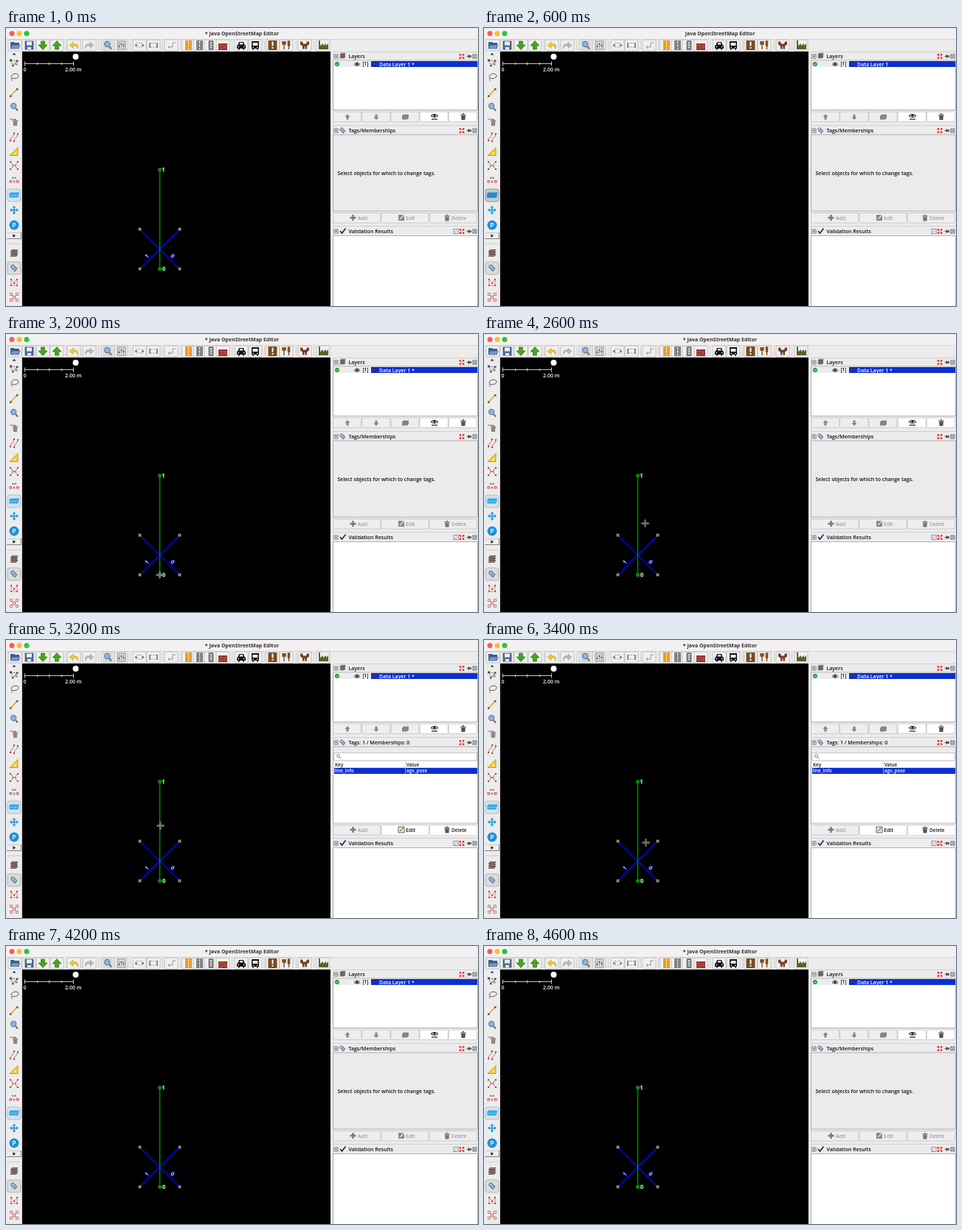
Animation, 640 px wide and 378 px high, one loop 4.8 s. Source, as an HTML page:

```html
<!DOCTYPE html>
<html lang="en">
<head>
<meta charset="utf-8">
<title>Map editor demo</title>
<style>
html, body { margin: 0; width: 100%; height: 100%; overflow: hidden; background: #ececec; }
svg { display: block; width: 640px; height: 378px; }
text { font: 600 7px "Open Sans", "Noto Sans", sans-serif; fill: #111; white-space: pre; }
.title { font-weight: 700; font-size: 7px; fill: #333; text-anchor: middle; }
.white { fill: #fff; }
.off { fill: #858585; font-weight: 500; }
.small { font-size: 6.4px; }
.line { fill: none; stroke: #555; stroke-width: .9; }
.red { stroke: #c4473f; }
.halo { paint-order: stroke; stroke-width: 2px; stroke-linejoin: round; fill: #fff; }

/* All states switch hard on a 200 ms grid. */
.drawn, .blank, .agv, .goal, .tagged, .idle, .arrow, .cross {
  animation: 4.8s step-end infinite;
}
.drawn { animation-name: drawn; }
.blank { animation-name: blank; }
.agv { animation-name: agv; }
.goal { animation-name: goal; }
.tagged { animation-name: tagged; }
.idle { animation-name: idle; }
.arrow { animation-name: arrow; }
.cross { animation-name: cross; }
@keyframes drawn { 0%, 37.5% { visibility: visible } 8.333% { visibility: hidden } }
@keyframes blank { 0%, 37.5% { visibility: hidden } 8.333% { visibility: visible } }
@keyframes agv { 0%, 75% { visibility: hidden } 62.5% { visibility: visible } }
@keyframes goal { 0%, 87.5% { visibility: hidden } 75% { visibility: visible } }
@keyframes tagged { 0%, 87.5% { visibility: hidden } 62.5% { visibility: visible } }
@keyframes idle { 0%, 87.5% { visibility: visible } 62.5% { visibility: hidden } }
@keyframes arrow {
  0%, 29.167% { visibility: hidden }
  16.667% { visibility: visible; transform: translate(17px, 222px) }
  20.833% { visibility: visible; transform: translate(13px, 228px) }
}
@keyframes cross {
  0% { visibility: hidden }
  29.167% { visibility: visible; transform: translate(130px, 290px) }
  33.333% { visibility: visible; transform: translate(208px, 327px) }
  45.833% { visibility: visible; transform: translate(212px, 300px) }
  50% { visibility: visible; transform: translate(217px, 266px) }
  54.167% { visibility: visible; transform: translate(218px, 257px) }
  58.333% { visibility: visible; transform: translate(212px, 253px) }
  62.5% { visibility: visible; transform: translate(209px, 252px) }
  70.833% { visibility: visible; transform: translate(219px, 275px) }
  75% { visibility: visible; transform: translate(223px, 284px) }
  87.5%, 100% { visibility: hidden }
}
</style>
</head>
<body>
<svg viewBox="0 0 640 378">
  <defs>
    <g id="well"><rect x="-9" y="-7.5" width="18" height="15" rx="1" fill="#f0f0f0" stroke="#b6b6b6" stroke-width=".8"/></g>
    <g id="glass">
      <path d="M2 2L5 5.5" stroke="#866a50" stroke-width="2"/>
      <circle cx="-.8" cy="-1" r="3.6" fill="#8fb6e4" stroke="#5c7ca6" stroke-width="1.2"/>
    </g>
    <g id="stack">
      <path d="M-5 4l2-3h8l-2 3zM-5 1l2-3h8l-2 3zM-5-2l2-3h8l-2 3z" fill="#8b6f68" stroke="#4d4140" stroke-width=".6"/>
    </g>
    <g id="tag">
      <path d="M-4-3l3-1 5 5-3 4-5-5z" fill="#8fabc8" stroke="#4f637b" stroke-width=".9"/>
      <circle cx="-2.2" cy="-2" r=".8" fill="#fff"/>
    </g>
    <g id="trash">
      <path d="M-3-2h6l-.6 6h-4.8z"/>
      <path d="M-3.8-3h7.6M-1-4.3h2" stroke="currentColor" stroke-width="1.2"/>
    </g>
    <g id="edit">
      <rect x="-4" y="-4" width="8" height="8" fill="#888"/>
      <path d="M-2 2L4-4" stroke="#ddd" stroke-width="1.5"/>
    </g>
    <g id="corner">
      <path d="M-3-3l2 2M3-3l-2 2M-3 3l2-2M3 3l-2-2" stroke="#d11" stroke-width="1.3"/>
      <path d="M-3-1v-2h2M3-1v-2h-2M-3 1v2h2M3 1v2h-2" fill="none" stroke="#d33" stroke-width=".8"/>
      <path d="M6.500 0h2.500M9-2.500v5M9-1h3.500v2H9" fill="#777" stroke="#444" stroke-width=".9"/>
      <rect x="15" y="-2.500" width="5" height="5" fill="#fff" stroke="#444" stroke-width=".8"/>
      <path d="M16-1.500l3 3m0-3l-3 3" stroke="#333" stroke-width=".8"/>
    </g>
    <g id="fold">
      <rect x="-2.500" y="-2.500" width="5" height="5" fill="#fff" stroke="#555" stroke-width=".8"/>
      <path d="M-1.500-.8h3L0 1.300z" fill="#222"/>
    </g>
    <g id="nodes">
      <path class="line red" d="M-4-4V4H4V-4L0 1z" stroke-dasharray="1.5 1"/>
      <path d="M-5 3h2v2h-2zM-5-5h2v2h-2zM3-5h2v2H3zM3 3h2v2H3zM-1 0h2v2h-2z" fill="#d33"/>
    </g>
    <rect id="end" x="-1.300" y="-1.300" width="2.600" height="2.600" fill="#111" stroke="#e8dc80" stroke-width=".9"/>
  </defs>

  <rect width="640" height="378" fill="#ececec"/>

  <!-- title bar -->
  <rect width="640" height="15" fill="#f2f0f1"/>
  <circle cx="8" cy="7.500" r="3.500" fill="#fc5b57"/>
  <circle cx="18" cy="7.500" r="3.500" fill="#fdbc2e"/>
  <circle cx="28" cy="7.500" r="3.500" fill="#29c440"/>
  <text class="title drawn" x="320" y="10">* Java OpenStreetMap Editor</text>
  <text class="title blank" x="320" y="10">Java OpenStreetMap Editor</text>

  <!-- toolbar -->
  <path d="M0 15.500H640" stroke="#d6d6d6"/>
  <g id="wells"></g>
  <path d="M81.500 17v13M125.500 17v13M168.500 17v13M212.500 17v13M236.500 17v13M306.500 17v13M350.500 17v13M393.500 17v13M417.500 17v13" stroke="#d2d2d2"/>
  <path d="M6 19h5l1 1h6v8H6z" fill="#3b5f8e"/>
  <path d="M6 28l2-5h11l-2 5z" fill="#6f9aca" stroke="#31527e" stroke-width=".6"/>
  <rect x="26" y="18" width="11" height="11" fill="#4a6f9e" stroke="#345" stroke-width=".7"/>
  <path d="M28 18.500h7v5h-7zM29 26h5v3h-5z" fill="#eee"/>
  <path d="M47.500 18h5v5h3.500L50 29.500 44 23h3.500z" fill="#49a416" stroke="#27750b" stroke-width=".7"/>
  <path d="M66.500 29h5v-5H75L69 17.500 63 24h3.500z" fill="#49a416" stroke="#27750b" stroke-width=".7"/>
  <path d="M97 28c2-6-2-7-6-6v-3l-5 4.500 5 4v-3c4-1 5 0 6 3.500z" fill="#f0cb32" stroke="#b8962c" stroke-width=".6"/>
  <path d="M108 28c-2-6 2-7 6-6v-3l5 4.500-5 4v-3c-4-1-5 0-6 3.500z" fill="#bcbcbc" stroke="#999" stroke-width=".6"/>
  <rect x="131" y="16.500" width="14" height="14" fill="#d9d9d9"/>
  <use href="#glass" x="138" y="23"/>
  <rect x="151" y="18" width="11" height="11" fill="#ddd" stroke="#777" stroke-width=".8"/>
  <path d="M153.500 20v7M156.500 20v7M159.500 20v7" stroke="#888" stroke-width=".8"/>
  <path d="M152.500 25h2M155.500 22h2M158.500 24h2" stroke="#444" stroke-width="1.500"/>
  <path class="line" d="M177 20.500h9M177 26h9M196 20.500h9M196 26h9" stroke-dasharray="2 1" style="stroke:#999"/>
  <path d="M175 22h3v3h-3zM184 22h3v3h-3zM194 20h2v7h-2zM204 20h2v7h-2z" fill="#888"/>
  <path class="line" d="M220 26h6V20M220 26l2-2m-2 2l2 2M226 20h4" style="stroke:#888"/>
  <rect x="243" y="17" width="9" height="13" fill="#f29a1c"/>
  <path d="M247.500 18v11" stroke="#fff" stroke-dasharray="3 1.500"/>
  <rect x="258" y="17" width="9" height="13" fill="#828282"/>
  <path d="M262.500 18v11" stroke="#fff" stroke-dasharray="3 1.500"/>
  <rect x="274.500" y="17" width="7" height="13" rx="1.500" fill="#777"/>
  <path d="M278 19v9" stroke="#ddd" stroke-width="2.500" stroke-dasharray="2.200 1"/>
  <path d="M288 21h12v9h-12z" fill="#9b3028"/>
  <path d="M288 24h12M288 27h12M292 21v3M297 24v3M292 27v3" stroke="#c07a70" stroke-width=".6"/>
  <path d="M313 28v-4l1.500-1 1.500-4h6l1.500 4 1.500 1v4h-2v1.500h-2V28h-4v1.500h-2V28z" fill="#111"/>
  <path d="M316.500 22.500l.8-2.500h3.500l.8 2.500z" fill="#eee"/>
  <path d="M333 18h10v10h-1v1.500h-2V28h-4v1.500h-2V28h-1z" fill="#111"/>
  <path d="M334.500 20h7v4h-7z" fill="#eee"/>
  <path d="M314.500 25.500h1.500M322 25.500h1.500M334.500 26.500h1.500M340 26.500h1.500" stroke="#eee" stroke-width="1.300"/>
  <rect x="355.500" y="17" width="12" height="13" rx="1" fill="#7a4a1c"/>
  <path d="M361.500 18.500v6M361.500 26v2" stroke="#fff" stroke-width="2"/>
  <path d="M377 18v11M375 18v4h4v-4M383.500 18v11M382.500 18h2v6h-2z" fill="#80501f" stroke="#80501f" stroke-width="1.500"/>
  <path d="M399 18.500h3l1 3h4l1-3h3v4l-3 2v4h-2.500V25h-1V28.500H402v-4l-3-2z" fill="#754027"/>
  <path d="M424 29V17h2v7l4-3v3l4-3v3l3-3v8z" fill="#5f5f2c"/>

  <!-- map -->
  <rect x="22" y="32" width="418" height="346"/>
  <circle cx="94.500" cy="39" r="4" fill="#fff"/>
  <path d="M25.500 48.500H91.500M25.500 45.500v6M91.500 45.500v6M42.500 47v3M58.500 46.500v4M75.500 47v3" stroke="#ddd" stroke-width=".9"/>
  <text class="white" x="23.500" y="58.500">0</text>
  <text class="white" x="80" y="58.500">2.00 m</text>
  <g class="drawn">
    <path d="M181.500 273.500L235.500 327.500M235.500 273.500L181.500 327.500" stroke="#0000f0" stroke-width="1.700"/>
    <path d="M208.500 192V327" stroke="#087c08" stroke-width="1.700"/>
    <circle cx="208.500" cy="192.500" r="2.600" fill="#0b860b"/>
    <circle cx="208.500" cy="327.500" r="2.600" fill="#0b860b"/>
    <use href="#end" x="181.500" y="273.500"/><use href="#end" x="235.500" y="273.500"/>
    <use href="#end" x="181.500" y="327.500"/><use href="#end" x="235.500" y="327.500"/>
    <g stroke="#075507">
      <text class="halo" x="211.500" y="195">1</text>
      <text class="halo" x="212" y="330">0</text>
    </g>
    <g stroke="#000090">
      <text class="halo" transform="translate(191 310) rotate(-45)" x="-2" y="2.500">1</text>
      <text class="halo" transform="translate(226 310) rotate(45)" x="-2" y="2.500">0</text>
    </g>
  </g>

  <!-- tool column -->
  <path d="M21.500 32V378" stroke="#cfcfcf"/>
  <path d="M8.500 36.500h5L11 34zM9.500 280l3.500 2.500-3.500 2.500z" fill="#222"/>
  <path d="M2 278.500h18M2 293.500h18" stroke="#ccc"/>
  <path d="M1 286.500H20.500V278" fill="none" stroke="#777" stroke-width=".9"/>
  <path class="line" d="M7 44l8 1M7 44l2 7M15 45l-6 6M11 49h6M14 46v6" stroke-dasharray="2 1"/>
  <path d="M5 42.500h3v3H5zM14 43.500h2.500v2.500H14zM8 50h2.500v2.500H8z" fill="#555"/>
  <ellipse class="line" cx="12" cy="65.500" rx="5" ry="3.200" transform="rotate(-12 12 65)"/>
  <path class="line" d="M8 68c-2 2 1 2 0 4"/>
  <path d="M6 93L15 83" stroke="#e0a82c" stroke-width="1.700"/>
  <path d="M5 91.500h2.500v2.500H5zM14 82h2.500v2.500H14z" fill="#75551b"/>
  <use href="#glass" x="11" y="107"/>
  <path class="line red" d="M5 124h7"/>
  <g transform="translate(12.500 129)" color="#555" fill="#888"><use href="#trash"/></g>
  <path class="line red" d="M6 153c0-5 4-4 5-10M11 154c0-5 4-4 5-10"/>
  <path d="M5 152h2v2H5zM10 142h2v2h-2zM10 153h2v2h-2zM15 143h2v2h-2z" fill="#a44"/>
  <path d="M5 173.500L16 162.500v11z" fill="#f3cd28" stroke="#b78b1c" stroke-width=".8"/>
  <path d="M10.500 171.500h3.500V168z" fill="#eee"/>
  <path class="line red" d="M6 182c4 3 4 7 0 10M16 182c-4 3-4 7 0 10"/>
  <path class="line" d="M9 187h4"/>
  <path d="M5 181h2v2H5zM15 181h2v2h-2zM5 191h2v2H5zM15 191h2v2h-2z" fill="#944"/>
  <path class="line" d="M8 204h6M8 204l1.500-1.500M14 204l-1.500-1.500"/>
  <path d="M5 207.500h2.500v2.500H5zM14.500 207.500h2.500v2.500h-2.500z" fill="none" stroke="#d33" stroke-width=".9"/>
  <path class="line red" d="M9.500 207.500l3 3m0-3l-3 3"/>
  <rect x="2" y="219" width="18" height="17" rx="3" fill="#d7e1eb" stroke="#a9b4bd" stroke-width=".8"/>
  <g class="drawn">
    <path d="M4.500 225l2-1.500H18l-1.500 7H4.500z" fill="#38a7e6"/>
    <path d="M6 227.500h10" stroke="#a9dcf7" stroke-width=".9" stroke-dasharray="2 1"/>
  </g>
  <g class="blank">
    <rect x="2" y="219" width="18" height="17" rx="3" fill="#c5c9ce" stroke="#8f969d" stroke-width=".8"/>
    <path d="M4 225l2-1.500H18.500l-1.500 7.500H4z" fill="#1f8dd4"/>
  </g>
  <path d="M11 241.500l2.500 3h-1.700v2.300h2.300v-1.700l3 2.500-3 2.500v-1.600h-2.300v2.300h1.700l-2.500 3-2.500-3h1.700v-2.300H7.900v1.600l-3-2.500 3-2.500v1.700h2.300v-2.300H8.500z" fill="#249be0"/>
  <circle cx="11" cy="268" r="6.500" fill="#238fd3"/>
  <text x="11" y="271.300" text-anchor="middle" style="font-size:9px;fill:#fff">P</text>
  <use href="#stack" x="11" y="306.500"/>
  <rect x="2" y="318" width="18" height="17" rx="3" fill="#dcdcdc" stroke="#a8a8a8" stroke-width=".8"/>
  <use href="#tag" x="11" y="326"/>
  <use href="#nodes" x="11" y="346"/>
  <path class="line red" d="M7 362l4 4 4-4M11 366l-4 4M11 366l4 4"/>
  <path d="M5.500 360.500h3v3h-3zM13.500 360.500h3v3h-3zM9.500 364.500h3v3h-3zM5.500 368.500h3v3h-3zM13.500 368.500h3v3h-3z" fill="#eee" stroke="#b55" stroke-width=".8"/>

  <!-- panels -->
  <path d="M441.500 32V378" stroke="#f7f7f7" stroke-width="2"/>
  <path d="M443.500 378V32.500H640M443.500 132.500H640M443.500 269.500H640" fill="none" stroke="#c9c9c9" stroke-width=".8"/>
  <use href="#fold" x="447.500" y="38.500"/><use href="#corner" x="618" y="38.500"/>
  <use href="#fold" x="447.500" y="139.500"/><use href="#corner" x="618" y="139.500"/>
  <use href="#fold" x="447.500" y="276.500"/><use href="#corner" x="618" y="276.500"/>
  <use href="#stack" transform="translate(456.500 38) scale(.75)"/>
  <use href="#tag" transform="translate(456.500 139) scale(.85)"/>
  <path d="M453 276l2.500 3 5-6.500" fill="none" stroke="#173c62" stroke-width="1.800"/>
  <rect x="607" y="273.500" width="6" height="6" fill="#fff" stroke="#777" stroke-width=".8"/>
  <path d="M608.500 276h1M610.500 276h1M608.500 278h1" stroke="#555"/>
  <text x="464.500" y="40.500">Layers</text>
  <text class="idle" x="464.500" y="141.500">Tags/Memberships</text>
  <text class="agv" x="464.500" y="141.500">Tags: 1 / Memberships: 0</text>
  <text class="goal" x="464.500" y="141.500">Tags: 2 / Memberships: 0</text>
  <text x="464.500" y="278.500">Validation Results</text>

  <g stroke="#a9a9a9" stroke-width=".9">
    <rect x="443.500" y="44" width="196" height="67.500" fill="#fff"/>
    <rect x="443.500" y="145" width="196" height="104" fill="#ebebeb"/>
    <rect x="443.500" y="282.500" width="196" height="97" fill="#fff"/>
  </g>
  <rect x="444" y="45" width="51" height="8" fill="#ececec"/>
  <rect x="495" y="45" width="144" height="8" fill="#0b2fd2"/>
  <circle cx="449" cy="49" r="3" fill="#1c9b32"/>
  <path d="M447.500 49l1.200 1.200 2-2.500" fill="none" stroke="#fff" stroke-width=".8"/>
  <g transform="translate(476 49)">
    <path d="M-4 .5Q0-4.500 4 .5Q0 4-4 .5z" fill="#e8e8e8" stroke="#333" stroke-width=".9"/>
    <circle cy=".2" r="1.600" fill="#223"/>
  </g>
  <text class="small" x="483.500" y="51.300">[1]</text>
  <path d="M498 46.500h4v5h-4z" fill="#18205c"/>
  <path d="M497.500 47l5 4M497.500 51l4-4" stroke="#6a4a78" stroke-width=".9"/>
  <text class="white drawn" x="506" y="51.500">Data Layer 1 *</text>
  <text class="white blank" x="506" y="51.500">Data Layer 1</text>

  <g id="layerKeys"></g>
  <path d="M463 117l3.500 4h-2v3.500h-3V121h-2zM502 125l3.500-4h-2v-3.500h-3v3.500h-2z" fill="#858585"/>
  <path d="M537 119.500l2-2h7v5l-2 2h-7z" fill="#858585"/>
  <path d="M576 119.500Q581 115 586 119.500Q581 123 576 119.500z" fill="#c8dff2" stroke="#222"/>
  <circle cx="581" cy="119" r="1.600" fill="#123"/>
  <path d="M577 124h8" stroke="#234c86" stroke-width="1.500"/>
  <g transform="translate(620 121)" color="#444" fill="#555"><use href="#trash"/></g>

  <g class="idle">
    <text x="449.500" y="199.700">Select objects for which to change tags.</text>
  </g>
  <g class="tagged">
    <rect x="445" y="153.500" width="193" height="10.500" fill="#fff" stroke="#bbb" stroke-width=".8"/>
    <circle cx="450.500" cy="157.500" r="2" fill="none" stroke="#777" stroke-width=".9"/>
    <path d="M452 159l2.500 2.500" stroke="#777"/>
    <rect x="444" y="165" width="195" height="83.500" fill="#fff"/>
    <path d="M444 173.500H639M541.500 165V174" stroke="#d0d0d0" stroke-width=".8"/>
    <text class="small" x="446" y="171.700">Key</text>
    <text class="small" x="543" y="171.700">Value</text>
    <rect x="445" y="174" width="194" height="8" fill="#0b2fd2"/>
    <path d="M541.500 174v8" stroke="#b8c4f0" stroke-width=".7"/>
  </g>
  <g class="agv">
    <text class="small white" x="445.500" y="180.200">line_info</text>
    <text class="small white" x="543" y="180.200">agv_pose</text>
  </g>
  <g class="goal">
    <text class="small white" x="445.500" y="180.200">goal_id</text>
    <text class="small white" x="543" y="180.200">1</text>
    <text class="small" x="445.500" y="188.700">line_info</text>
    <text class="small" x="543" y="188.700">goal_pose</text>
  </g>

  <g id="tagKeys"></g>
  <path d="M470.500 254v8M466.500 258h8" stroke="#777" stroke-width="2.400"/>
  <text class="off" x="477" y="260.700">Add</text>
  <g class="idle">
    <use href="#edit" x="536" y="258"/>
    <text class="off" x="542" y="260.700">Edit</text>
    <g transform="translate(598 258.500)" color="#777" fill="#777"><use href="#trash"/></g>
    <text class="off" x="604" y="260.700" style="font-size:6.700px">Delete</text>
  </g>
  <g class="tagged">
    <rect x="510" y="252" width="63" height="13" fill="#fff"/>
    <rect x="575" y="252" width="63.500" height="13" fill="#fff"/>
    <rect x="532" y="254" width="8" height="8" fill="#dce8f3" stroke="#345" stroke-width=".8"/>
    <path d="M534 260l6-6" stroke="#c89024" stroke-width="1.600"/>
    <text x="542" y="260.700">Edit</text>
    <g transform="translate(598 258.500)" color="#444" fill="#555"><use href="#trash"/></g>
    <text x="604" y="260.700" style="font-size:6.600px">Delete</text>
  </g>

  <!-- pointers -->
  <path class="arrow" d="M0 0v8l2-1.700 1.300 2.700 1.300-.7-1.300-2.600h2.500z" stroke="#fff" stroke-width=".7"/>
  <g class="cross">
    <path d="M-4.500 .5h10M.5-4.500v10" stroke="#ccc" stroke-width="1.800"/>
    <path d="M-4 .5h9M.5-4v9" stroke="#333" stroke-width=".7"/>
  </g>
</svg>
<script>
const byId = id => document.getElementById(id);

byId("wells").innerHTML = [12, 31, 50, 69, 92, 113, 138, 156, 181, 200, 224, 247.5, 263, 278, 294, 319, 338, 361.5, 380, 405, 430]
  .map(x => `<use href="#well" x="${x}" y="23.500"/>`).join("");

function keyRow(id, y, h, count, enabledFrom) {
  const step = 196 / count;
  byId(id).innerHTML = Array.from({ length: count }, (_, i) =>
    `<rect x="${443.5 + i * step}" y="${y}" width="${step - 1}" height="${h}" rx="1" ` +
    `fill="${i >= enabledFrom ? "#fff" : "#eee"}" stroke="#c2c2c2" stroke-width=".8"/>`).join("");
}
keyRow("layerKeys", 114, 13.5, 5, 3);
keyRow("tagKeys", 251.5, 13.5, 3, 3);
</script>
</body>
</html>
```
